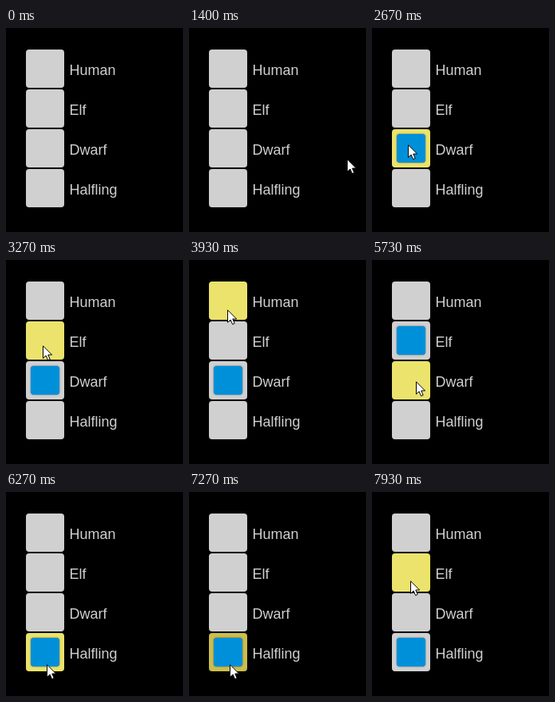
An HTML page that plays this animation: 222 by 256 pixels, repeating every 8000 ms.

```html
<!DOCTYPE html>
<html lang="en">
<head>
<meta charset="utf-8">
<title>Radio buttons</title>
<style>
html, body { margin: 0; width: 100%; height: 100%; overflow: hidden; background: #000; }
#stage { position: relative; width: 222px; height: 256px; overflow: hidden; background: #000; }
.box { position: absolute; left: 25px; width: 48px; height: 48px; border-radius: 4px; background: #d0d0d0; }
.box.hover { background: #ebe36b; }
.box.press { background: #cbbd4e; }
.mark {
  position: absolute; left: 6px; top: 6px; width: 36px; height: 36px; border-radius: 4px;
  background: #0090d9; box-shadow: 0 0 2px rgba(0, 0, 0, .6); visibility: hidden;
}
.checked .mark { visibility: visible; }
.label {
  position: absolute; left: 79.5px; font: 18px/20px Arial, "Liberation Sans", sans-serif;
  color: #d0d0d0; white-space: pre;
}
#cursor { position: absolute; left: 0; top: 0; overflow: visible; }
</style>
</head>
<body>
<div id="stage"></div>
<script>
const LOOP = 8000, TICK = 1000 / 15;
const TOP = 27, PITCH = 50;
const stage = document.getElementById('stage');

const boxes = ['Human', 'Elf', 'Dwarf', 'Halfling'].map((name, i) => {
  const y = TOP + i * PITCH;
  const box = add('box', y);
  box.innerHTML = '<div class="mark"></div>';
  add('label', y + 16).textContent = name;
  return box;
});

stage.insertAdjacentHTML('beforeend',
  `<svg id="cursor" width="14" height="21">
    <path d="M.5 .8V16.4L4.1 13L6.6 18.7L9.2 17.6L6.8 12H11.6Z" fill="#fff" stroke="#000"/>
  </svg>`);
const cursor = document.getElementById('cursor');

// Pointer moves: start tick, end tick, from, to; it rests until the next one.
const moves = [
  [10, 14, 209, 223, 198, 165],
  [21, 22, 198, 164, 178, 165],
  [28, 34, 61, 150, 45, 146],
  [42, 51, 45, 146, 46, 96],
  [54, 59, 46, 96, 48, 62],
  [66, 75, 48, 62, 59, 101],
  [82, 91, 59, 101, 51, 216],
  [114, 119, 51, 216, 48, 111]
];
// Over a label the pointer is not visible.
const hidden = [[0, 10], [23, 28]];
// Button down, button up, row.
const clicks = [[37, 40, 2], [61, 64, 0], [77, 79, 1], [92, 94, 3], [100, 105, 3], [109, 112, 3]];

function add(cls, y) {
  const el = document.createElement('div');
  el.className = cls;
  el.style.top = y + 'px';
  return stage.appendChild(el);
}

const within = (n, [from, to]) => n >= from && n < to;

function pointerAt(n) {
  if (hidden.some(span => within(n, span))) return null;
  const [start, end, x0, y0, x1, y1] = moves.filter(m => m[0] <= n).pop();
  const p = Math.min(1, (n - start) / (end - start));
  return [Math.round(x0 + (x1 - x0) * p), Math.round(y0 + (y1 - y0) * p)];
}

function draw(ms) {
  const n = Math.floor(ms / TICK + .1);
  const pos = pointerAt(n);
  const over = pos && pos[0] < 73 ? Math.floor((pos[1] - TOP) / PITCH) : -1;
  const down = clicks.some(c => within(n, c));
  const last = clicks.filter(c => c[1] <= n).pop();
  boxes.forEach((box, i) => {
    box.classList.toggle('hover', i === over);
    box.classList.toggle('press', i === over && down);
    box.classList.toggle('checked', !!last && last[2] === i);
  });
  cursor.style.visibility = pos ? 'visible' : 'hidden';
  if (pos) cursor.style.transform = `translate(${pos[0]}px, ${pos[1]}px)`;
}

const begin = performance.now();
function frame() {
  draw((performance.now() - begin) % LOOP);
  requestAnimationFrame(frame);
}
frame();
</script>
</body>
</html>
```
